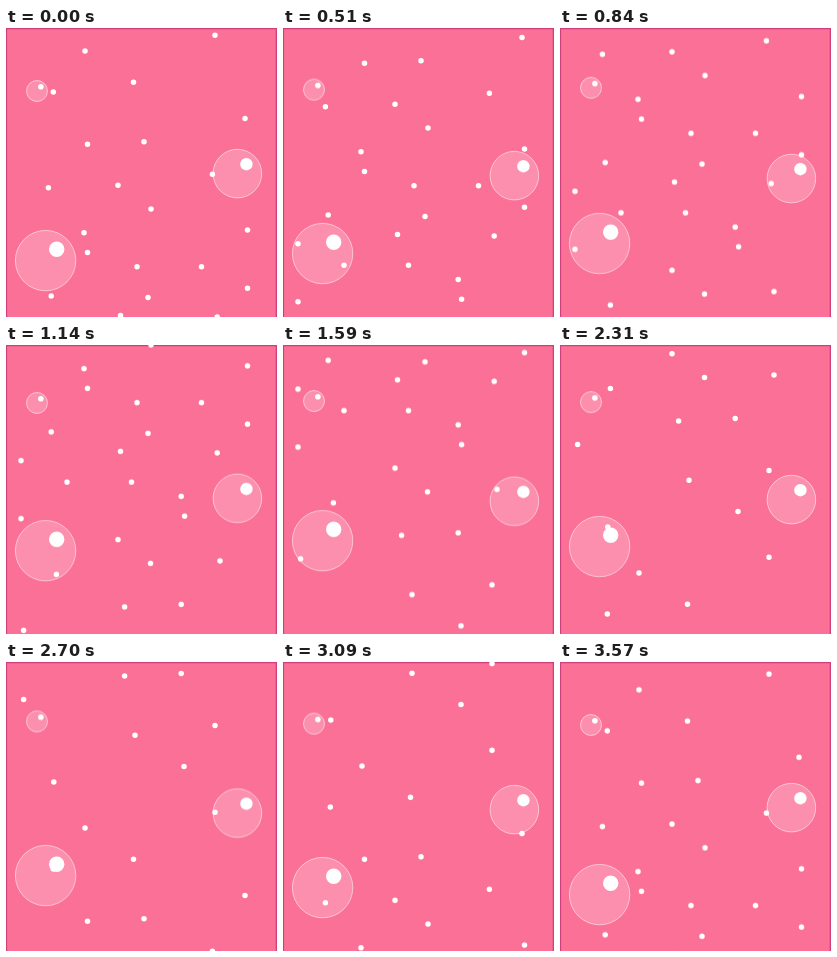
Write an HTML page that moves like this. It is 271x289 px and loops after 3600 ms.

```html
<!DOCTYPE html>
<html lang="en">
<head>
<meta charset="utf-8">
<title>Rising bubbles</title>
<style>
  html, body { margin: 0; width: 100%; height: 100%; overflow: hidden; background: #fa7096; }
  svg { display: block; width: 271px; height: 289px; }
  .edge { fill: none; stroke: #cf3f7b; stroke-width: 1.4; }
  .dots { animation: rise 3600ms steps(120) infinite; }
  #dots { fill: none; stroke: #fff; stroke-width: 5.5; stroke-linecap: round; }
  .bubble { animation: bob 1800ms cubic-bezier(.364, 0, .636, 1) infinite alternate; }
  .skin { fill: #fff; fill-opacity: .22; stroke: #fff; stroke-opacity: .6; stroke-width: .9; }
  .shine { fill: #fff; }
  @keyframes rise { to { transform: translateY(-572px); } }
  @keyframes bob { to { transform: translateY(var(--drift)); } }
</style>
</head>
<body>
<svg viewBox="0 0 271 289">
  <defs>
    <path id="dots" d="M209 7.3h.01M79 23h.01M127.5 54.2h.01M47.3 64h.01M239 90.4h.01M138 113.7h.01
      M81.5 116.3h.01M206.4 146.2h.01M112 157.2h.01M42.4 159.8h.01M145 181h.01M241.5 202h.01
      M78 204.7h.01M81.5 224.5h.01M131 238.7h.01M195.5 238.7h.01M241.5 260.3h.01M45.2 268h.01
      M142 269.6h.01M114.5 287.4h.01M211.2 289h.01M15 296.8h.01M61 318.3h.01M125.5 318.3h.01
      M175.2 332.4h.01M178.6 352.3h.01M15 354.8h.01M112 375.8h.01M214 397h.01M144.5 399.5h.01
      M50.4 410.5h.01M175.2 440.5h.01M118.6 443h.01M17.6 466.5h.01M209 492.5h.01M129 502.3h.01
      M178 533.4h.01M47.8 549h.01"/>
  </defs>
  <rect width="271" height="289" fill="#fa7096"/>
  <path class="edge" d="M.4 289V.6H270.4V289"/>

  <g class="bubble" style="--drift: -7.2px">
    <circle class="skin" cx="31" cy="63" r="10.5"/>
    <circle class="shine" cx="34.9" cy="58.8" r="2.8"/>
  </g>
  <g class="bubble" style="--drift: 11px">
    <circle class="skin" cx="231.4" cy="145.6" r="24.3"/>
    <circle class="shine" cx="240.4" cy="136.2" r="6.2"/>
  </g>
  <g class="bubble" style="--drift: -38.2px">
    <circle class="skin" cx="39.6" cy="232.6" r="30.2"/>
    <circle class="shine" cx="50.7" cy="221.2" r="7.7"/>
  </g>

  <g class="dots">
    <use href="#dots"/>
    <use href="#dots" y="572"/>
  </g>
</svg>
</body>
</html>
```
